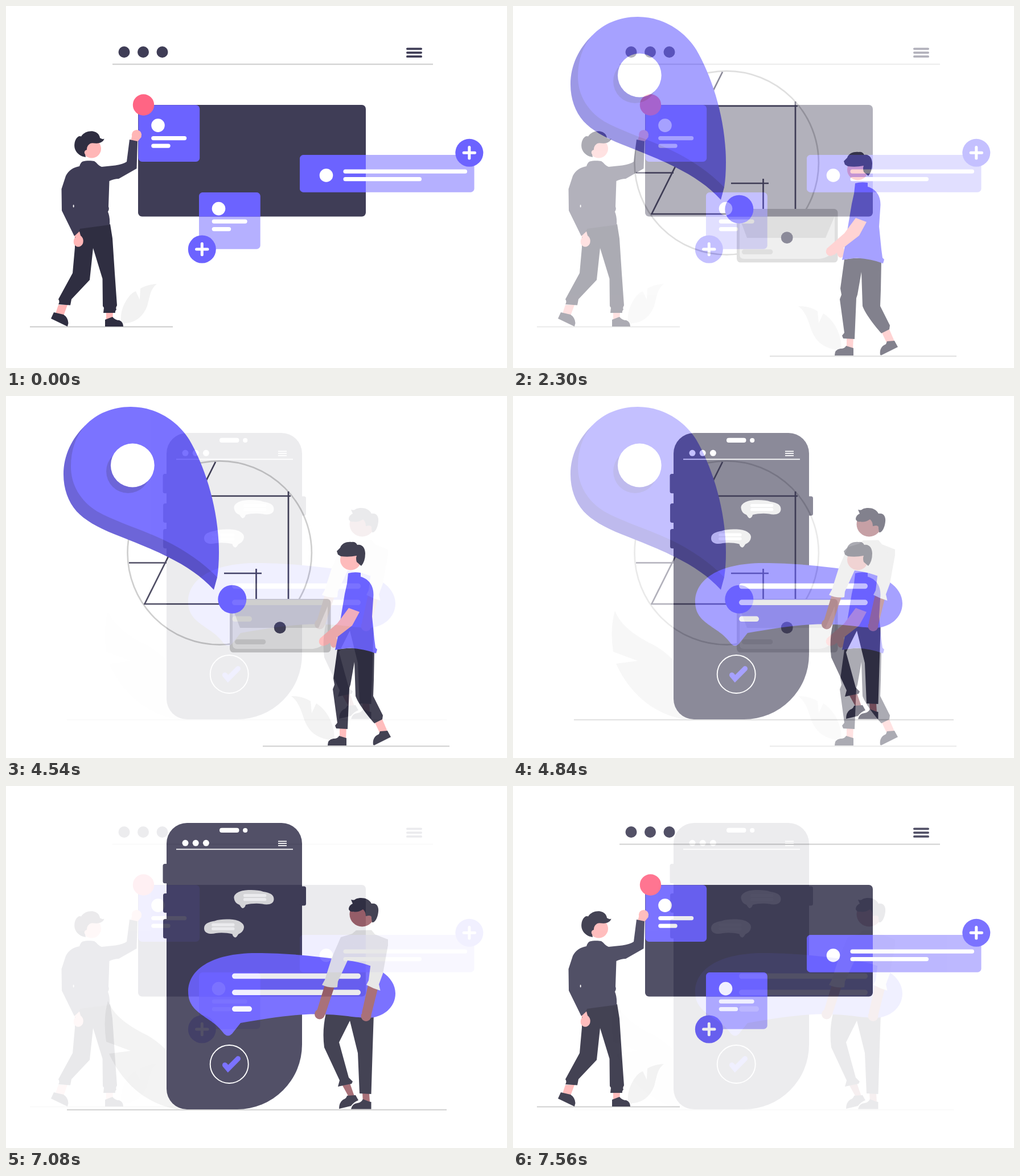
Animation, 880 px wide and 637 px high, one loop 7.62 s. Source, as an HTML page:

```html
<!DOCTYPE html>
<html lang="en">
<head>
<meta charset="utf-8">
<title>Crossfading scenes</title>
<style>
html, body { margin: 0; width: 880px; height: 637px; overflow: hidden; background: #fff; }
svg { position: absolute; left: 0; top: 0; width: 880px; height: 637px; display: block; }

.dark { fill: #3f3d56; }
.ink { fill: #2f2e41; }
.blue { fill: #6c63ff; }
.white { fill: #fff; }
.skin { fill: #ffb6b6; }
.brown { fill: #a0616a; }
.grey { fill: #cacaca; }
.pale { fill: #e6e6e6; }
.leaf { fill: #f2f2f2; }
.ground { stroke: #cbcbcb; stroke-width: 2; }
.street { stroke: #3f3d56; stroke-width: 2.7; fill: none; }

/* Fades advance in 60 ms steps; each step starts with its new value. */
#parcel { animation: parcel 7620ms infinite; }
#phone { animation: phone 7620ms infinite; }
@keyframes parcel {
  0% { opacity: 0; animation-timing-function: step-end; }
  26.246% { opacity: 0; animation-timing-function: steps(10, jump-start); }
  34.12% { opacity: 1; animation-timing-function: step-end; }
  92.913%, 100% { opacity: 0; animation-timing-function: step-end; }
}
@keyframes phone {
  0% { opacity: 0; animation-timing-function: step-end; }
  59.58% { opacity: 0; animation-timing-function: steps(10, jump-start); }
  67.453% { opacity: 1; animation-timing-function: step-end; }
  92.913% { opacity: 1; animation-timing-function: steps(9, jump-start); }
  100% { opacity: .1; }
}
</style>
</head>
<body>

<svg id="board" viewBox="0 0 880 637">
  <defs>
    <clipPath id="panel"><rect x="232" y="174" width="400" height="196.5" rx="7"/></clipPath>
    <g id="cards">
      <rect x="339" y="328" width="107.7" height="99.7" rx="6.5"/>
      <rect x="516" y="262" width="306.5" height="65.7" rx="6.5"/>
    </g>
    <g id="plus">
      <circle r="24.5" class="blue"/>
      <path d="M-9.7 0H9.7M0-9.7V9.7" stroke="#fff" stroke-width="5" stroke-linecap="round"/>
    </g>
    <g id="note" class="white">
      <circle cx="11.8" cy="11.8" r="11.8"/>
      <rect y="30.7" width="62" height="7.2" rx="3.6"/>
      <rect y="44.2" width="33.5" height="7.2" rx="3.6"/>
    </g>
  </defs>
  <rect width="880" height="637" class="white"/>
  <g class="dark">
    <circle cx="207.5" cy="81" r="10"/>
    <circle cx="241" cy="81" r="10"/>
    <circle cx="274.5" cy="81" r="10"/>
    <rect x="703" y="73.4" width="28" height="3.8" rx="1.9"/>
    <rect x="703" y="80.2" width="28" height="3.8" rx="1.9"/>
    <rect x="703" y="87" width="28" height="3.8" rx="1.9"/>
    <rect x="232" y="174" width="400" height="196.5" rx="7"/>
  </g>
  <path d="M187 102.5H750" class="ground"/>

  <rect x="232.5" y="174.3" width="107.7" height="99.7" rx="6.5" class="blue"/>
  <use href="#note" x="255.2" y="198.3"/>
  <circle cx="241.5" cy="174" r="18.7" fill="#ff6584"/>
  <use href="#cards" class="blue" opacity=".5"/>
  <g clip-path="url(#panel)"><use href="#cards" class="blue"/></g>
  <use href="#note" x="361.7" y="344.8"/>
  <g class="white">
    <circle cx="562.5" cy="298" r="11.8"/>
    <rect x="592.5" y="287.6" width="217.5" height="7.2" rx="3.6"/>
    <rect x="592.5" y="301.1" width="137.5" height="7.2" rx="3.6"/>
  </g>
  <use href="#plus" x="344.3" y="428"/>
  <use href="#plus" x="813.8" y="258.3"/>

  <path class="leaf" d="M203 561C199 543 205 525 217 510Q222 504 228 502L235 517 236 497Q248 490 265 489C253 499 253 510 248 528C241 546 228 557 210 558Z"/>
  <path d="M42 564.5H293" class="ground"/>
  <g class="skin">
    <path d="M92 526H108L101 545 87 541Z"/>
    <path d="M176 539H188L187 553H176Z"/>
    <path d="M219 238 223 222 238 230 231 239Z"/>
    <circle cx="229.5" cy="226.5" r="8.6"/>
    <circle cx="150.5" cy="251" r="16.5"/>
  </g>
  <g class="ink">
    <path d="M140 266C126 264 119 253 120.300 243C121 234 127 227 132 229.500C136 222 147 219 153 220.500C160 222 164 226 165 232C168 234 170 235 172.500 233.500C172 237 168 240 164 241C158 243 152 240 148 242C143 245 142 249 142 253C137 254 137 259 139 261Z"/>
    <path d="M128 391 183 384 187 409 191 470 195 527Q192 531 194 534 191 537 192 540L171 540 172 531 170 528 169.500 480 153 426 147 482 115 516 113 526.500 92 525Q95 520 92 516L117 470 121 425V400Z"/>
    <path d="M84 539 101 543Q109 548 109.500 558L108 564 79 550Z"/>
    <path d="M174 552 187 547Q192 553 199 553 206 556 206 564H174Z"/>
  </g>
  <path class="dark" d="M135 273.500C140 272 150 272 155 273 160 276 162 281 168 283L192 280.500Q206 278 212 274L217 235 231 238 229.500 286 198 304Q190 304 181.500 308L180 353Q182 358 179 362 183 372 182 385L130 392 128 397 120 405 98 360 97.500 322 105 299Q112 285 129 282 131 275 135 273.500Z"/>
  <ellipse cx="118.600" cy="352" rx="1" ry="2.500" class="white"/>
  <path class="skin" d="M120 405 129 396.500 131 404C136 408 136.500 413 135 418 132 425 123 426 119.500 419 118 414 119 409 122 407Z"/>
</svg>

<svg id="parcel" viewBox="0 0 880 637">
  <rect width="880" height="637" class="white"/>
  <circle cx="375.200" cy="276" r="161.700" fill="none" stroke="#cacaca" stroke-width="2.700"/>
  <path class="street" d="M368 116 243.500 366M340 176H500M496 168V358M216 293.500H282M242 366H398M383 312H449M439.500 304V358"/>

  <path fill="#5c54d4" d="M365 341C343 317 318 300 284 283 250 266 222 256 190 243 160 231 138 218 124 203 109 186 101 163 101 138 101 104 116 74 139 52L250 100 371 319Z"/>
  <path class="blue" d="M371 319C345 292 310 268 270 250 235 234 190 220 160 203 130 184 114 156 114 124 114 96 122 71 139 52 159 31 187 19 219 19 262 19 300 42 322 77 350 125 374 200 374 275Q374 300 371 319Z"/>
  <circle cx="214.500" cy="132.500" r="38.400" fill="#5c54d4"/>
  <circle cx="222.300" cy="122" r="38.400" class="white"/>

  <rect x="393" y="357" width="177.500" height="94.300" rx="6.500" class="grey"/>
  <path fill="#e4e4e4" d="M398 373 411 408H549L565 370V424C563 437 550 444 538 445H406Q398 445 398 437Z"/>
  <rect x="402" y="428.300" width="54.300" height="8.600" rx="4.300" class="grey"/>
  <circle cx="481.200" cy="407.700" r="10.400" class="dark"/>
  <circle cx="397.300" cy="357.700" r="25" class="blue"/>

  <path class="leaf" d="M501 528Q520 528 535 537L537 558 545 541C560 550 572 568 576 590L577 606C550 604 533 594 524 570 518 552 514 538 501 528Z"/>
  <path d="M451 616.300H779" class="ground"/>
  <g class="skin">
    <path d="M586 583H598L597 604H586Z"/>
    <path d="M648 575 661 569 670 590 657 594Z"/>
    <circle cx="605.500" cy="288" r="18.500"/>
    <ellipse cx="575.500" cy="432" rx="6.500" ry="11"/>
  </g>
  <g class="ink">
    <path d="M588 282 583 279 581 273 587 267C590 258 600 256 607 257Q614 256 617 262C625 260 631 267 631 277Q631 291 624 299L616 292Q614 286 616 281 602 284 588 282Z"/>
    <path d="M582 446Q610 440 647 448L646 500 645 528 662 562 661 569 647 576C633 560 618 540 614 528L612 468 605 508 603 514 600 586 580 585 578 580 582 575 574 516 577 508 575 497Z"/>
    <path d="M565 615Q565 604 575 603 583 603 585 598L598 602V615Z"/>
    <path d="M645 614Q643 600 655 595L657 590 670 589 676 600 647 614.500Z"/>
  </g>
  <path class="blue" d="M601 312Q611 309 623 311L623 318C638 322 646 335 645.500 350L643 388 647 428 649 443 652 446 650 453Q630 445 605 443.500 590 444 578 447L582 428 588 390 595 348 599 330Z"/>
  <path class="skin" d="M602 373 621 380 608 404 564 438 551 427 582 400Z"/>
  <circle cx="557.500" cy="432" r="7.800" class="skin"/>
</svg>

<svg id="phone" viewBox="0 0 880 637">
  <defs>
    <g id="bubble">
      <path class="pale" d="M400.500 197C400 189 412 184 420 183.500 432 182.500 444 183 452 186 464 188 470.500 191 470.500 199 470.500 208 460 210 450 207.500 440 206 430 207 421 209 420 213 418 215 415 215 412 213 412 211 410 209 404 207 401 202 400.500 197Z"/>
      <g class="white">
        <rect x="417" y="190" width="40.300" height="5.300" rx="2.600"/>
        <rect x="417" y="197" width="40.300" height="5.300" rx="2.600"/>
      </g>
    </g>
  </defs>
  <rect width="880" height="637" class="white"/>
  <path class="leaf" d="M179 378C190 405 215 422 245 437Q270 450 290 474L304 569C250 562 205 525 181 471L219 466 176 450Q170 410 179 378Z"/>
  <path d="M107 569.800H774" class="ground"/>
  <g class="dark">
    <path d="M318 65H484A36 36 0 0 1 520 101V455A114 114 0 0 1 406 569H318A36 36 0 0 1 282 533V101A36 36 0 0 1 318 65Z"/>
    <rect x="275.500" y="137" width="12" height="34.300" rx="3.500"/>
    <rect x="276" y="189" width="12" height="34" rx="3.500"/>
    <rect x="276" y="234" width="12" height="34.300" rx="3.500"/>
    <rect x="515" y="176.500" width="12" height="34" rx="3.500"/>
  </g>
  <g class="white">
    <rect x="375" y="73.800" width="34.500" height="8.200" rx="4.100"/>
    <circle cx="420.200" cy="78" r="4.100"/>
    <circle cx="315" cy="100.300" r="5.500"/>
    <circle cx="333.200" cy="100.300" r="5.500"/>
    <circle cx="351.400" cy="100.300" r="5.500"/>
  </g>
  <path d="M299 111.300H504M478 97.300H493M478 101.100H493M478 104.900H493" stroke="#fff" stroke-width="1.800"/>
  <use href="#bubble"/>
  <use href="#bubble" transform="translate(818.5 51.500) scale(-1 1)"/>
  <circle cx="392.200" cy="489.500" r="33.500" fill="none" stroke="#fff" stroke-width="1.900"/>
  <path d="M384.500 491 390 497.500 407.500 479.800" fill="none" stroke="#6c63ff" stroke-width="9" stroke-linecap="round"/>

  <g class="brown">
    <path d="M591 527 604 523 612 546 602 547Z"/>
    <path d="M626 540H638L639 556H627Z"/>
    <circle cx="625.500" cy="225.500" r="22"/>
  </g>
  <g class="ink">
    <path d="M602 217Q602 210 609 207L606 200Q612 202 614 199C624 195 637 197 642 207 652 205 655 214 654 221 653 232 648 241 643 240L642 233Q643 228 637 228L632 229Q632 221 627 217 618 223 610 221 604 222 602 217Z"/>
    <path d="M562 400H646L644 460 641.500 542 621 541 618 470 604 413 585 451 602 513 609 520 607 524Q596 526 583 529L586 518 559 460Q555 430 562 400Z"/>
    <path d="M585 568Q585 557 592 552 598 550 599 545L614 544 619 553Q611 556 606 563Z"/>
    <path d="M606 568.500Q608 559 617 558 624 557 627 551L637 555 641.500 556V568.500Z"/>
  </g>
  <path class="pale" d="M588 266 608 260 615 254 642 253.500 648 261 671 270V280L655 325 600 312Z"/>
  <path class="blue" d="M320 362C320 325 358 294 440 294 500 294 545 300 600 307 650 313 684 335 684 365 684 390 662 408 635 408 605 407 590 402 548 401.500 505 401 460 409 412 417L397 436Q390 443 383 436C370 418 355 411 346 404 330 393 320 382 320 362Z"/>
  <g class="white">
    <rect x="397" y="329.700" width="226" height="9.600" rx="4.800"/>
    <rect x="397" y="358.500" width="226" height="9.600" rx="4.800"/>
    <rect x="397" y="387.500" width="35" height="9.600" rx="4.800"/>
  </g>
  <g class="brown">
    <path d="M560 350 577 353 560 404 546 396Z"/>
    <circle cx="551" cy="401.500" r="9"/>
    <path d="M636 350 653 357 641 405 625 399Z"/>
    <circle cx="632.500" cy="405" r="9"/>
  </g>
  <g class="pale">
    <path d="M588 266 612 280 600 307 583 344 582 354Q568 356 555 350L560 341 572 303Z"/>
    <path d="M671 270V280L662 330 655 349 657.500 360Q644 356 633 350L637 342 640 318 645 280Z"/>
  </g>
</svg>

</body>
</html>
```
